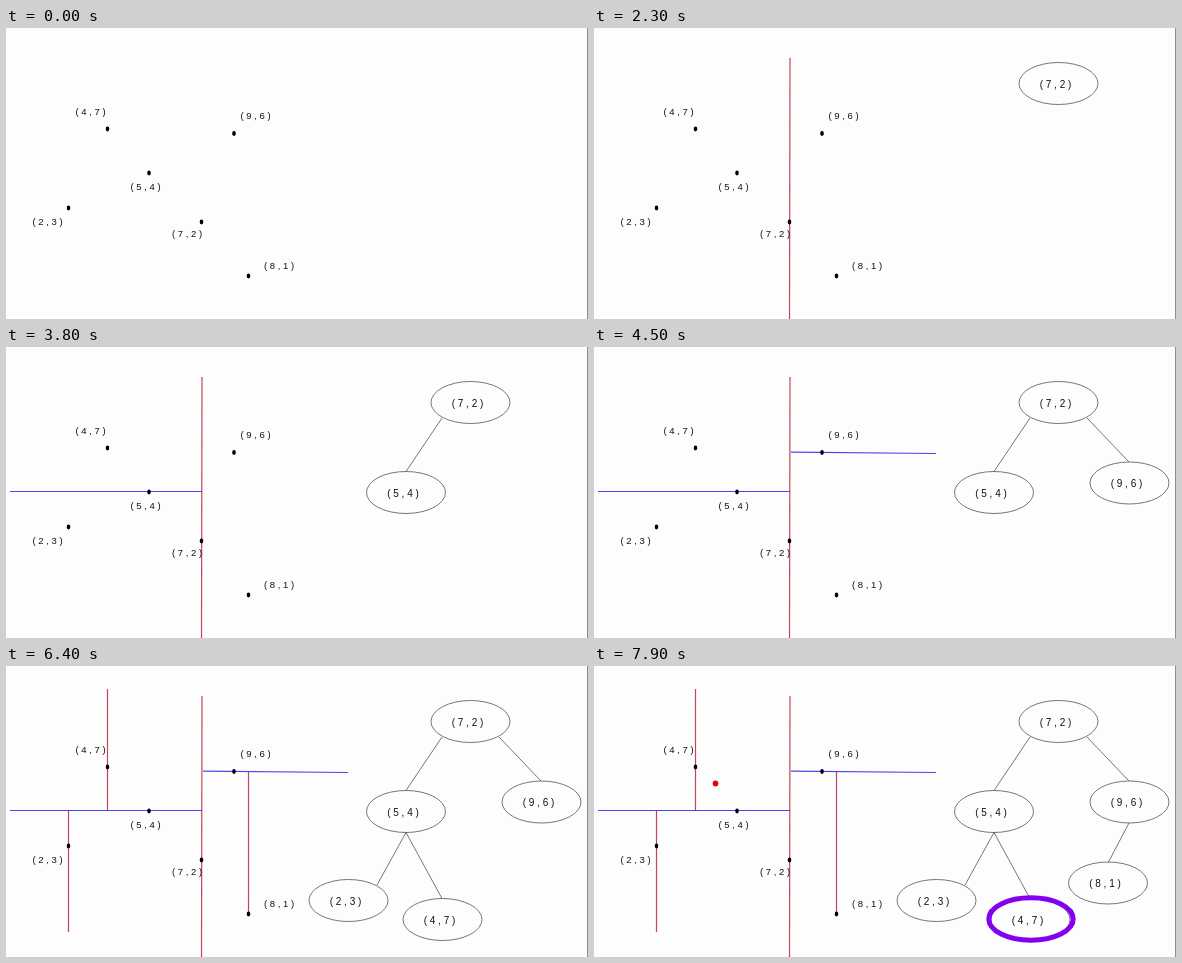
Write an HTML page with a canvas that moves like this. It is 582 by 291 pixels and loops after 8 s.

```html
<!DOCTYPE html>
<html lang="en">
<head>
<meta charset="utf-8">
<title>Building a k-d tree</title>
<style>
html, body { margin: 0; width: 100%; height: 100%; overflow: hidden; background: #fdfdfe; }
canvas { display: block; width: 582px; height: 291px; }
</style>
</head>
<body>
<canvas></canvas>
<script>
const W = 582, H = 291, LOOP = 8000;
const RED = '#c04652', BLUE = '#4646ee', INK = '#555';
const canvas = document.querySelector('canvas');
const ctx = canvas.getContext('2d');
const ratio = window.devicePixelRatio || 1;
canvas.width = W * ratio;
canvas.height = H * ratio;
ctx.scale(ratio, ratio);

function line(x1, y1, x2, y2, color, width) {
  ctx.strokeStyle = color;
  ctx.lineWidth = width;
  ctx.beginPath();
  ctx.moveTo(x1, y1);
  ctx.lineTo(x2, y2);
  ctx.stroke();
}

function oval(x, y, rx, ry) {
  ctx.beginPath();
  ctx.ellipse(x, y, rx, ry, 0, 0, Math.PI * 2);
}

function label(name, x, y, size) {
  ctx.font = size + 'px "Liberation Sans", Arial, sans-serif';
  ctx.textAlign = 'center';
  ctx.fillStyle = '#111';
  ctx.fillText('( ' + name + ' )', x, y);
}

function point(name, x, y, lx, ly) {
  oval(x, y, 1.8, 2.4);
  ctx.fillStyle = '#000';
  ctx.fill();
  label(name, lx, ly, 9.5);
}

function node(name, x, y, edge) {
  if (edge) line(...edge, INK, 0.8);
  oval(x, y, 39.5, 21);
  ctx.strokeStyle = INK;
  ctx.lineWidth = 0.8;
  ctx.stroke();
  label(name, x - 3, y + 4, 10);
}

const split = (color, ...ends) => line(...ends, color, 1.2);

// Each step appears at its time and stays until the loop ends.
const steps = [
  [1600, () => split(RED, 196, 30, 195.5, 291)],
  [2200, () => node('7 , 2', 464.5, 55.5)],
  [2800, () => split(BLUE, 4, 144.5, 196, 144.5)],
  [3400, () => node('5 , 4', 400, 145.5, [436, 71, 400, 124.5])],
  [3900, () => split(BLUE, 197, 105.2, 342, 106.5)],
  [4400, () => node('9 , 6', 535.5, 136, [493, 71, 535, 115])],
  [4900, () => split(RED, 101.5, 23, 101.5, 144)],
  [5500, () => split(RED, 62.5, 145, 62.5, 266)],
  [5800, () => node('2 , 3', 342.5, 234.5, [400, 166.5, 371, 219])],
  [6000, () => node('4 , 7', 436.5, 253.5, [400, 166.5, 436, 232.5])],
  [6300, () => split(RED, 242.5, 106, 242.5, 248)],
  [6700, () => node('8 , 1', 514, 217, [535, 157, 514.5, 196])],
  [7400, () => {
    oval(121.5, 117.5, 2.8, 2.9);
    ctx.fillStyle = '#e8000c';
    ctx.fill();
  }],
  [7700, () => {
    oval(437, 253, 42.2, 21.2);
    ctx.strokeStyle = '#8400f0';
    ctx.lineWidth = 5;
    ctx.stroke();
  }]
];

function draw(t) {
  ctx.fillStyle = '#fdfdfe';
  ctx.fillRect(0, 0, W, H);
  line(581.5, 0, 581.5, H, '#8c8c8c', 1);
  for (const [start, show] of steps) if (t >= start) show();
  point('4 , 7', 101.5, 101, 84.5, 87);
  point('9 , 6', 228, 105.5, 249.5, 91);
  point('5 , 4', 143, 145, 139.5, 162);
  point('2 , 3', 62.5, 180, 41.5, 197);
  point('7 , 2', 195.5, 194, 181, 208.5);
  point('8 , 1', 242.5, 248, 273, 241);
}

const began = performance.now();
function frame() {
  draw((performance.now() - began) % LOOP);
  requestAnimationFrame(frame);
}
frame();
</script>
</body>
</html>
```
